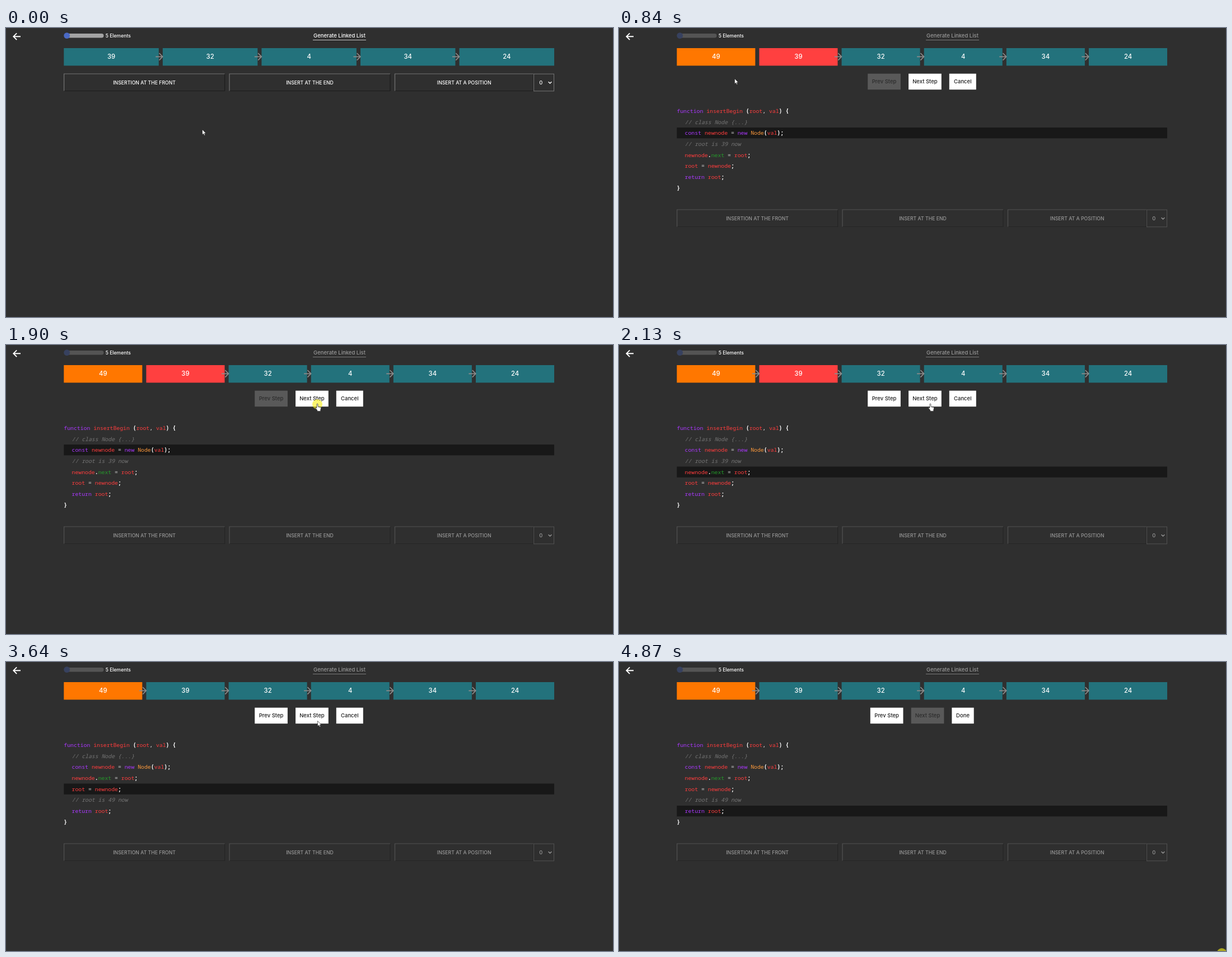
Recreate the animation shown at these times as an HTML page. Size 1084x517 px, loop 4950 ms.

```html
<!DOCTYPE html>
<html lang="en">
<head>
<meta charset="utf-8">
<title>Linked list insertion</title>
<style>
  html, body { margin: 0; width: 100%; height: 100%; overflow: hidden; background: #2f2f2f; }
  svg { display: block; width: 100%; height: 100%; }
  text { font-family: Inter, "Open Sans", sans-serif; font-weight: 500; }
  .code { font: 400 9.8px "Noto Sans Mono", "DejaVu Sans Mono", monospace; white-space: pre; }
</style>
</head>
<body>
<svg id="stage" viewBox="0 0 1084 517"></svg>
<script>
const LOOP = 4950;
const LEFT = 103.3, RIGHT = 979;
const TEAL = '#23727c', ORANGE = '#ff7700', RED = '#ff4040';
const stage = document.getElementById('stage');

// time, pointer shape, tip x, tip y
const POINTER = [
  [0, 'arrow', 350.5, 181.5], [70, 'arrow', 325, 163], [120, 'arrow', 268, 118],
  [170, 'arrow', 222, 80], [220, 'arrow', 206, 68], [390, 'arrow', 207, 73],
  [465, 'hand', 207, 84], [540, 'hand', 206, 91], [770, 'arrow', 206.5, 90.5],
  [990, 'arrow', 215, 96], [1070, 'arrow', 245, 112], [1150, 'arrow', 310, 132],
  [1230, 'arrow', 395, 142], [1310, 'arrow', 480, 144], [1390, 'arrow', 542, 140],
  [1470, 'arrow', 569, 133], [1560, 'arrow', 564, 120], [1650, 'hand', 560, 109],
  [1820, 'hand', 556, 105], [3640, 'arrow', 556.5, 105.5], [4870, 'none', 0, 0]
];
// from, to, centre x, centre y
const PRESSES = [
  [700, 770, 206, 91], [1900, 2060, 556, 106], [4410, 4510, 556, 106], [4870, LOOP, 1076.5, 521]
];
// time, then highlighted rows with their strength
const BARS = [
  [0], [840, [2, 1]], [2060, [2, .5], [4, .5]], [2130, [4, 1]], [2700],
  [2770, [4, 1]], [3710, [4, .5], [6, .5]], [3790, [6, 1]]
];
const STEPS = [...new Set([...POINTER, ...PRESSES, ...BARS].map(s => s[0]))].sort((a, b) => a - b);

const HEAD = ['function insertBegin (root, val) {', '  // class Node {...}', '  const newnode = new Node(val);'];
const LINK = '  newnode.next = root;', MOVE = '  root = newnode;';
const TAIL = ['  return root;', '}'];
const CODE_BEFORE = [...HEAD, '  // root is 39 now', LINK, MOVE, ...TAIL];
const CODE_AFTER = [...HEAD, LINK, MOVE, '  // root is 49 now', ...TAIL];

const last = (list, t) => list.filter(s => s[0] <= t).pop();
const rect = (x, y, w, h, fill, more = '') =>
  `<rect x="${x}" y="${y}" width="${w}" height="${h}" fill="${fill}" ${more}/>`;
const line = (d, color, w = 1) =>
  `<path d="${d}" fill="none" stroke="${color}" stroke-width="${w}"/>`;
const text = (x, y, s, size, fill = '#fff', anchor = 'middle') =>
  `<text x="${x}" y="${y}" font-size="${size}" fill="${fill}" text-anchor="${anchor}">${s}</text>`;
const group = (opacity, body) => `<g opacity="${opacity}">${body}</g>`;

function header(dim) {
  const slider = rect(104, 10, 70.5, 7.4, '#a3a3a3', 'rx="3.7"') +
    '<circle cx="108.7" cy="13.6" r="5.4" fill="#4a69c4"/>';
  const title = text(595.5, 17.3, 'Generate Linked List', 9.5) + line('M548 21.5H643', '#c4c4c4');
  return line('M26 15.2H13.5M19.2 9.3L13.3 15.2L19.2 21.1', '#fff', 1.9) +
    group(1 - .68 * dim, slider) +
    text(177.7, 17.2, '5 Elements', 8.6, '#fff', 'start') +
    group(1 - .5 * dim, title);
}

function nodes(values, colors, hiddenLink) {
  const gap = 7.1, n = values.length;
  const w = (RIGHT - LEFT - gap * (n - 1)) / n;
  let boxes = '', links = '';
  values.forEach((v, i) => {
    const x = LEFT + i * (w + gap);
    boxes += rect(x, 36, w, 31.4, colors[i] || TEAL) + text(x + w / 2, 55.3, v, 11.3);
    if (i < n - 1 && i !== hiddenLink) {
      const e = x + w;
      links += line(`M${e - 5.5} 51.3H${e + 6.8}M${e + .8} 45L${e + 7} 51.3L${e + .8} 57.6`, '#8c8c8c', 1.7);
    }
  });
  return boxes + links;
}

function outset(x, y, w, label) {
  const h = 30.5;
  return line(`M${x} ${y + h}H${x + w}V${y}`, '#1c1c1c', 1.2) +
    line(`M${x} ${y + h}V${y}H${x + w}`, '#747474', 1.2) +
    text(x + w / 2, y + 18.6, label, 8.7);
}

function actions(y, dim) {
  return group(1 - .5 * dim,
    outset(103.6, y, 287, 'INSERTION AT THE FRONT') +
    outset(399, y, 287, 'INSERT AT THE END') +
    outset(694.5, y, 247.3, 'INSERT AT A POSITION') +
    rect(942.5, y + .2, 36, 30.6, 'none', 'stroke="#767676"') +
    text(955.3, y + 18.8, '0', 9.4) +
    line(`M968.6 ${y + 14.2}l2.9 2.9l2.9 -2.9`, '#fff', 1.4));
}

const button = (x, w, label, opacity = 1) =>
  group(opacity, rect(x, 81.7, w, 28.5, '#fff') + text(x + w / 2, 99.2, label, 9.5, '#1e1e1e'));

function controls(t) {
  const fade = (at, a, b) => t < at ? a : t < at + 70 ? (a + b) / 2 : b;
  const done = t >= 3710;
  const x = done ? 448.8 : 444.2;
  return button(x, 58.7, 'Prev Step', fade(2060, .2, 1)) +
    button(x + 72.9, 58.7, 'Next Step', fade(3710, 1, .2)) +
    button(x + 145.6, done ? 39.3 : 48, done ? 'Done' : 'Cancel');
}

function tokenColor(s) {
  if (/^(function|const|new|return)$/.test(s)) return '#ab38ff';
  if (s === 'Node') return '#ff9a3c';
  if (s === 'next') return '#259a2b';
  if (s === '=') return '#d8d8d8';
  return /\w/.test(s) ? '#ff3d3d' : '#fff';
}

function codeLine(src, row) {
  const s = src.trim();
  const x = src === s ? LEFT : 117.6, y = 151.8 + 19.73 * row;
  if (s.startsWith('//'))
    return `<text class="code" x="${x}" y="${y}" fill="#757575" style="font-style:italic">${s}</text>`;
  const spans = s.replace(/\w+|[^\w\s]/g, m =>
    `<tspan fill="${tokenColor(m)}"${/[(){};.]/.test(m) ? ' font-weight="600"' : ''}>${m}</tspan>`);
  return `<text class="code" x="${x}" y="${y}">${spans}</text>`;
}

function code(t) {
  const bars = last(BARS, t).slice(1).map(([row, a]) =>
    rect(LEFT, 138.6 + 19.73 * row, RIGHT - LEFT, 19.3, '#181818', `opacity="${a}"`));
  return bars.join('') + (t < 2700 ? CODE_BEFORE : CODE_AFTER).map(codeLine).join('');
}

function pointer(t) {
  const [, shape, x, y] = last(POINTER, t);
  const shapes = {
    none: '',
    arrow: '<path d="M0 0V9.4L2.2 7.4L3.7 10.7L5.2 10L3.8 6.9H6.6Z" fill="#fff" stroke="#111" stroke-width=".6"/>',
    hand: '<path d="M-1 1C-1 -.3 1 -.3 1 1V5L5.5 6Q6.8 6.4 6.6 8L5.8 11V13.4H-.2V11.8L-3 8.2C-3.7 7 -2.4 6.2 -1 7.7Z" fill="#fff" stroke="#222" stroke-width=".7"/>' +
      '<path d="M2.6 5.3V7.2M4.5 5.7V7.4" stroke="#222" stroke-width=".5"/>'
  };
  const presses = PRESSES.filter(p => t >= p[0] && t < p[1]).map(p =>
    `<circle cx="${p[2]}" cy="${p[3]}" r="9" fill="#f7ef18" opacity=".62"/>`);
  return presses.join('') + `<g transform="translate(${x} ${y})">${shapes[shape]}</g>`;
}

function scene(t) {
  if (t < 770)
    return header(0) + nodes([39, 32, 4, 34, 24], []) + actions(82, 0) + pointer(t);
  const dim = t < 840 ? .5 : 1;
  return header(dim) +
    nodes([49, 39, 32, 4, 34, 24], [ORANGE, t < 2700 ? RED : TEAL], t < 2060 ? 0 : -1) +
    controls(t) + code(t) + actions(325, dim) + pointer(t);
}

let shown = -1;
function draw(now) {
  const t = now % LOOP;
  const step = STEPS.filter(s => s <= t).length;
  if (step !== shown) {
    shown = step;
    stage.innerHTML = scene(t);
  }
  requestAnimationFrame(draw);
}
const start = performance.now();
draw(0);
function tick() { return performance.now() - start; }
</script>
</body>
</html>
```
